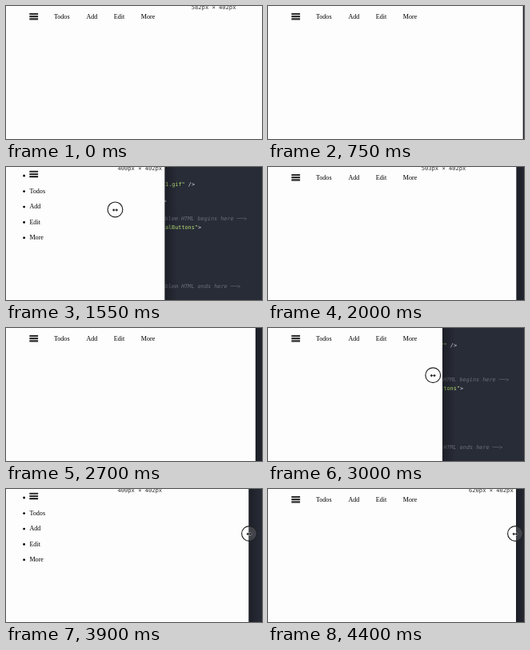
An HTML page that plays this animation: 320 px wide and 167 px high, repeating every 4450 ms.

```html
<!DOCTYPE html>
<html lang="en">
<head>
<meta charset="utf-8">
<title>Responsive menu</title>
<style>
  html, body { margin: 0; width: 100%; height: 100%; overflow: hidden; background: #282c37; }
  svg { display: block; width: 100vw; height: 100vh; }
  text { white-space: pre; }
  .code { font: 6.82px "DejaVu Sans Mono", "Liberation Mono", monospace; fill: #dfe2e8; }
  .code .str { fill: #b8e074; }
  .code .note { fill: #6c707a; font-style: italic; }
  .menu { font: 8.11px "Liberation Serif", "Times New Roman", serif; fill: #000; }
  .icon { fill: #2b2b2b; }
  #size { font: 7.12px "DejaVu Sans Mono", "Liberation Mono", monospace; fill: #333; }
</style>
</head>
<body>
<svg viewBox="0 0 320 167" preserveAspectRatio="none">
  <defs>
    <linearGradient id="shade">
      <stop offset="0" stop-color="#000" stop-opacity=".3"/>
      <stop offset="1" stop-color="#000" stop-opacity="0"/>
    </linearGradient>
    <g id="bars" class="icon">
      <rect width="10.8" height="2.1" rx=".5"/>
      <rect y="3.2" width="10.8" height="2.1" rx=".5"/>
      <rect y="6.4" width="10.8" height="2.1" rx=".5"/>
    </g>
  </defs>

  <rect width="320" height="167" fill="#282c37"/>
  <g class="code" text-anchor="end">
    <text x="236" y="23.6"><tspan class="str">l1.gif"</tspan> /&gt;</text>
    <text x="200.5" y="45.4">/&gt;</text>
    <text x="301" y="66.8" class="note">problem HTML begins here ──&gt;</text>
    <text x="244" y="77.6"><tspan class="str">alButtons"</tspan>&gt;</text>
    <text x="293" y="152.4" class="note">problem HTML ends here ──&gt;</text>
  </g>

  <g id="page">
    <rect x="-400" width="400" height="167" fill="#fdfdfd"/>
    <rect width="16" height="167" fill="url(#shade)"/>
  </g>

  <g id="row" class="menu">
    <use href="#bars" x="29.3" y="8.9"/>
    <text x="59.9" y="15.8">Todos</text>
    <text x="100.4" y="15.8">Add</text>
    <text x="134.8" y="15.8">Edit</text>
    <text x="168.7" y="15.8">More</text>
  </g>
  <g id="list" class="menu">
    <use href="#bars" x="29.3" y="4.7"/>
    <circle cx="22.6" cy="11" r="1.4"/>
  </g>
  <text id="size" y="3.6"></text>

  <g id="cursor">
    <circle r="9.4" fill="#fff" fill-opacity=".15" stroke="#222" stroke-width="1.15"/>
    <path d="M-3.6 .6 L-1.3 -1.4 V.1 H1.3 V-1.4 L3.6 .6 L1.3 2.6 V1.1 H-1.3 V2.6 Z"
          fill="#1a1a1a" stroke="#fff" stroke-width=".6" paint-order="stroke"/>
  </g>
</svg>

<script>
const LOOP = 4450, STEP = 50;
const SCALE = 0.507, MIN_W = 400, MIN_X = 198.4;
const LAG = 140; // the page lays itself out this long after the window grows
const $ = id => document.getElementById(id);

// time, x of the window's right edge: two squeezes, each followed by a release
const edge = [
  [-372, MIN_X], [60, 364], [550, 364], [700, 322],
  [1182, MIN_X], [1633, MIN_X], [2230, 364], [2550, 364], [2600, 322],
  [3141, MIN_X], [3760, MIN_X], [3910, 304.5], [4100, 304.5], [4250, 310]
];

// time, pointer x, pointer y
const pointer = [
  [750, 345, 64], [1380, 31, 52.5], [1790, 318, 55], [2200, 350, 55],
  [2660, 345, 64], [3380, 41, 53.5], [3780, 304, 56], [4200, 304, 56], [4400, 309, 56]
];

// Value of a track at time t, with sine easing between its key points
function at(track, t, col = 1) {
  const i = track.findIndex(k => k[0] > t);
  if (i < 0) return track.at(-1)[col];
  if (i === 0) return track[0][col];
  const a = track[i - 1], b = track[i];
  const p = (t - a[0]) / (b[0] - a[0]);
  return a[col] + (b[col] - a[col]) * (1 - Math.cos(Math.PI * p)) / 2;
}

$('list').innerHTML += ['Todos', 'Add', 'Edit', 'More'].map((word, i) => {
  const y = 32.6 + i * 19.45;
  return `<circle cx="22.6" cy="${y - 2}" r="1.4"/><text x="29.4" y="${y}">${word}</text>`;
}).join('');

const show = (id, on) => $(id).setAttribute('visibility', on ? 'visible' : 'hidden');
const move = (id, x, y) => $(id).setAttribute('transform', `translate(${x} ${y})`);

function draw(now) {
  const t = Math.floor(now % LOOP / STEP) * STEP;
  const x = at(edge, t), before = at(edge, t - LAG);
  const width = Math.round(MIN_W + (Math.min(x, before) - MIN_X) / SCALE);
  const narrow = width <= MIN_W;

  move('page', x, 0);
  move('cursor', at(pointer, t), at(pointer, t, 2));
  show('list', narrow);
  show('row', !narrow);
  show('size', narrow || x >= before); // hidden while the window shrinks
  $('size').setAttribute('x', 139.5 + (width - MIN_W) * SCALE);
  $('size').textContent = `${width}px × 402px`;
}

const start = performance.now();
function tick() {
  draw(performance.now() - start);
  requestAnimationFrame(tick);
}
tick();
</script>
</body>
</html>
```
